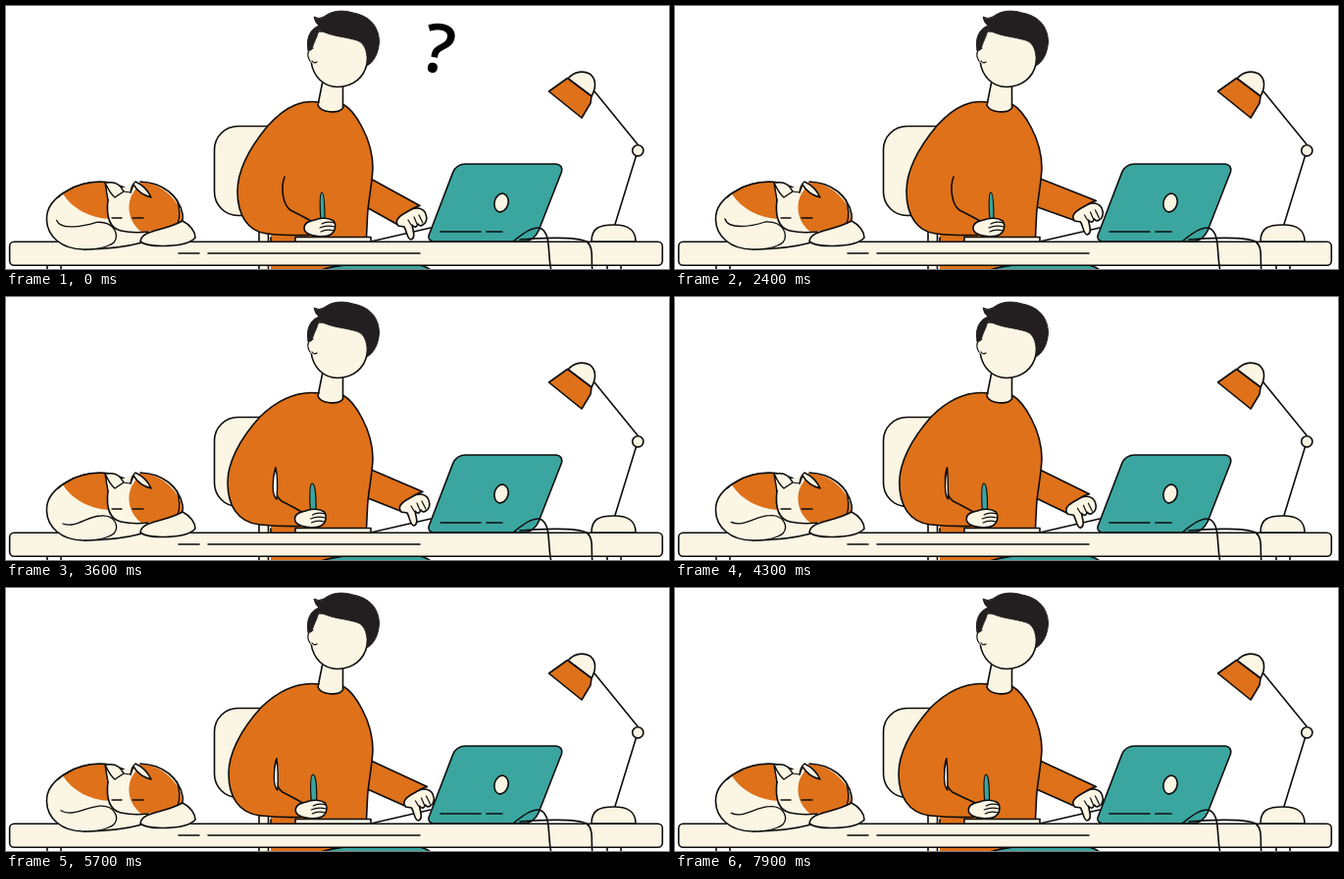
Animation of 676 by 268 pixels, one loop 8000 ms. Source, as an HTML page with a canvas:

```html
<!DOCTYPE html>
<html lang="en">
<head>
<meta charset="utf-8">
<title>At the desk</title>
<style>
html, body { margin: 0; width: 100%; height: 100%; overflow: hidden; background: #fff; }
canvas { display: block; }
</style>
</head>
<body>
<canvas id="stage" width="676" height="268"></canvas>
<script>
const ctx = document.getElementById('stage').getContext('2d');
const LOOP = 8000, STEP = 100, TAP = 550;
const ORANGE = '#de7119', TEAL = '#3ba59f', CREAM = '#fbf5e4', INK = '#0c0c0c', HAIR = '#231f20';
const LINE = 1.6;

const lerp = (a, b, k) => a + (b - a) * k;

// Eased value from [time, value] pairs
function track(keys, t) {
  for (let i = 1; i < keys.length; i++) {
    const [t0, v0] = keys[i - 1], [t1, v1] = keys[i];
    if (t <= t1) return lerp(v0, v1, (1 - Math.cos(Math.PI * (t - t0) / (t1 - t0))) / 2);
  }
  return keys[keys.length - 1][1];
}

const elbow = [[0, 0], [2400, 0], [3600, 1], [4900, .5], [5700, .9], [6800, .6], [8000, .8]];
const pen = [[0, 0], [2400, 0], [3600, 1], [4900, .5], [5700, .92], [6800, .47], [8000, .5]];
const lift = [[0, 0], [2400, -5], [3600, -5], [4900, -1], [5700, -1], [8000, -1]];
const reach = [[0, 0], [200, 7.5], [300, 3], [500, 0], [TAP, 0]];
const tail = [[0, .1], [2400, 0], [3600, 1], [4900, .8], [5700, .7], [6800, .2], [8000, .9]];

function shape(d, fill, line = INK, width = LINE) {
  const p = new Path2D(d);
  if (fill) { ctx.fillStyle = fill; ctx.fill(p); }
  if (line) { ctx.strokeStyle = line; ctx.lineWidth = width; ctx.stroke(p); }
}

function outlined(fill) {
  ctx.fillStyle = fill;
  ctx.fill();
  ctx.strokeStyle = INK;
  ctx.lineWidth = LINE;
  ctx.stroke();
}

function oval(x, y, rx, ry, turn, fill) {
  ctx.beginPath();
  ctx.ellipse(x, y, rx, ry, turn, 0, Math.PI * 2);
  outlined(fill);
}

function box(x, y, w, h, r, fill) {
  ctx.beginPath();
  ctx.roundRect(x, y, w, h, r);
  outlined(fill);
}

function at(x, y, draw) {
  ctx.save();
  ctx.translate(x, y);
  draw();
  ctx.restore();
}

function chair() {
  box(258, 205, 9.5, 75, 0, CREAM);
  box(212.5, 122.5, 90, 91, 24, CREAM);
}

function head() {
  shape('M323 76L318 101C321 109 339 110 343.5 104V74Z', CREAM);
  shape('M316 26C309 36 309 46 311 56C313 72 324 82.5 338 82.5C354 82 365 73 368 59C371 44 367 30 350 25Z', CREAM);
  shape('M317 43C308 41 306 50 310 56C312 59 315 59 317 57', CREAM, null);
  shape('M313 43C308 43 306 50 310 56M312 56Q314 59 317 57', null, INK, 1.2);
  shape('M308 45C306 34 309 24 319 20Q315 17 314 11Q319 14 324 11C333 4 344 4 354 7C371 10 380 21 380.5 36C380 48 375 57 368 61C369 49 367 38 358 35C345 31 331 31 319 24C317 33 314 36 312 44Q310 46 308 45Z', HAIR, HAIR, 1);
}

function typingArm(x, y) {
  shape(`M370 175L${422 + x} ${203.5 + y}Q${407 + x} ${207 + y} ${401.5 + x} ${224 + y}L364 203Z`, ORANGE);
}

function typingHand(x, y) {
  at(x, y, () => {
    shape('M400 224C396 219 400 215 405 212L412 208C418 204 426 206 428 212C430 217 428 222 425 223Q422 225 420 222Q418 227 415 224L414 223C415 229 418 236 413 238C409 238 409 230 406 225Z', CREAM);
    shape('M413 223L410 218M419 222L416 215M425 221L421 213', null, INK, 1.2);
  });
}

function torso() {
  const side = 'C355 106 374 135 374 165C373 185 369 200 368.5 215L367.5 236';
  shape(`M319 98C301 96 283 108 274 126L274 190L270 236V280H367L367.5 236L343.5 100${side}L343.5 280L300 110Z`, ORANGE, null);
  shape(`M343.5 100${side}V280H270V236L274 126Q285 100 319 98Q330 112 343.5 100Z`, ORANGE, null);
  shape(`M343.5 100${side}M270 236V240`, null);
  shape('M318 98C320 109 339 110 343.5 103', null);
}

function writingArm(e, h) {
  const out = -10 * e, hx = -9.5 * h;
  const ix = lerp(284, 275, e), wx = 309 + hx;
  const outer = `M319 98C303 96 ${287 + out * .5} 100 ${267 + out * .8} 122C${247 + out} 146 ${236 + out} 170 ${236 + out} 189C${236 + out} 212 ${246 + out} 230 ${266 + out * .7} 232Q${283 + out * .3} 234 ${wx} 233.5`;
  const inner = `L${wx + 2} 219Q${ix + 18} 214 ${ix + 6} 208C${ix - 2} 202 ${ix - 4} 185 ${ix} 174`;
  shape(outer + inner + 'L300 120Z', ORANGE, null);
  shape(outer, null);
  shape(`M${wx + 2} 219` + inner, null);
  if (e > .5) {
    const gap = 4 * (e - .5);
    shape(`M${ix} 174C${ix - 2 - gap} 187 ${ix - 2 - gap} 202 ${ix + 1} 206C${ix + gap} 194 ${ix + gap} 183 ${ix} 174Z`, '#fff', INK, 1.4);
  }
}

function writingHand(h) {
  at(-9.5 * h, 0, () => {
    const bend = 1 - h;
    shape(`M${320 + bend} 219Q${318 + bend} 191 ${322 - h * .4} 190Q${325 + h} 190 ${325 + h * .5} 219Z`, TEAL, INK, 1.2);
    shape('M304 226C304 220 311 219 315 218C321 215 330 216 334 219C337 223 336 230 331 233C326 236 313 235 308 232Q304 230 304 226Z', CREAM);
    shape('M335 221Q327 219 322 222M335 225Q327 223 320 226M334 229Q327 227 321 230', null, INK, 1.2);
  });
}

function laptop() {
  shape('M372 240L433 226', null);
  shape('M436 240Q430 239 431 234L455.5 170Q459 161 469 161H561Q568 162 566.5 169L543 229Q538 240 527 240Z', TEAL);
  oval(505, 200.5, 7, 9.5, .25, CREAM);
  shape('M443 230H484M490 230H506', null);
}

function desk() {
  shape('M42 264V280H56V264M613 264V280H627V264', '#fff');
  shape('M318 270Q340 262 375 263H415Q428 264 434 270Z', TEAL);
  box(3.7, 240.2, 665.6, 24, 4.5, CREAM);
  shape('M176 252H197M206 252H422', null);
}

function cable() {
  shape('M517 240C528 231 539 223 546 227C556 233 552 254 556 270', null);
  shape('M524 238C545 236 581 235 592 240C600 246 596 259 598 270', null);
}

function lamp() {
  shape('M620.5 224L643 151M644 141L600 87', null);
  shape('M597 240C597 226 605 223 620 223C635 223 642 228 642 240Z', CREAM);
  oval(644.3, 147.3, 5.6, 5.6, 0, CREAM);
  shape('M573 74C580 66 589 66 595 69C602 74 602 83 597 92Z', CREAM);
  shape('M572.5 73.5L597 92L596 99L587 114L553.5 87Z', ORANGE);
}

function cat(s) {
  shape('M107 180C92 178 76 180 63 188C48 196 41 207 41.5 218C42 234 56 248 79 248Q113 248 139 241L176 205Z', CREAM);
  shape('M58 191.5C73 180 91 179 107 180V199L105 217C86 216 68 207 58 191.5Z', ORANGE, null);
  shape('M107 180C92 178 76 180 63 188Q57 191 53 195', null);

  const a = lerp(51, 58, s), b = lerp(217, 231, s), top = lerp(220, 223, s);
  shape(`M${a} ${b}C${lerp(54, 72, s)} ${lerp(228, 236, s)} ${lerp(77, 82, s)} ${lerp(225, 223, s)} ${lerp(92, 97, s)} ${top}C111 ${top - 1} 116 234 110 241Q101 248 79 248`, CREAM, INK, 1.3);

  shape('M104 197C101 213 105 226 117 229Q135 233 150 228L178 222C184 210 169 181 137 179Q120 183 107 193Z', CREAM, null);
  shape('M128 193C122 207 127 222 138 230L165 228L178 222C184 208 165 181 137 179Z', ORANGE, null);
  shape('M104 197C102 213 105 226 117 229Q130 232 145 230', null);
  shape('M137 179C160 180 176 193 180 212Q181 218 178 222', null);
  shape('M174 197Q179 211 175 222', null, INK, 1.3);
  shape('M104 197L101 181Q113 176 120 189Q112 192 109 197Z', CREAM, null);
  shape('M104 198L101 180Q106 191 111 195L120 189Q115 178 103 180', null, INK, 1.5);
  shape('M127 190Q128 182 132 179Q143 184 148 195Q136 192 130 182Z', CREAM, INK, 1.5);
  shape('M120 189L127 190', null, INK, 1.2);
  shape('M108 216H118M129 216H140', null, INK, 1.3);
  shape('M137 240C138 228 160 230 180 219C188 223 193 230 193 236C185 246 146 247 137 240Z', CREAM);
}

function question() {
  at(441.5, 42, () => {
    ctx.rotate(.19);
    ctx.font = '600 69px "Open Sans", sans-serif';
    ctx.textAlign = 'center';
    ctx.fillStyle = '#000';
    ctx.fillText('?', 0, 26);
  });
}

function draw(t) {
  const e = track(elbow, t), h = track(pen, t);
  const x = track(reach, t % TAP), y = track(lift, t);
  ctx.fillStyle = '#fff';
  ctx.fillRect(0, 0, 676, 268);
  ctx.lineCap = ctx.lineJoin = 'round';
  chair();
  typingArm(x, y);
  torso();
  head();
  writingArm(e, h);
  box(295, 235.5, 77, 5, 0, CREAM);
  laptop();
  typingHand(x, y);
  writingHand(h);
  desk();
  lamp();
  cable();
  cat(track(tail, t));
  if (t < 2000) question();
}

const start = performance.now();
function tick() {
  const t = (performance.now() - start) % LOOP;
  draw(Math.floor(t / STEP) * STEP);
  requestAnimationFrame(tick);
}
tick();
</script>
</body>
</html>
```
